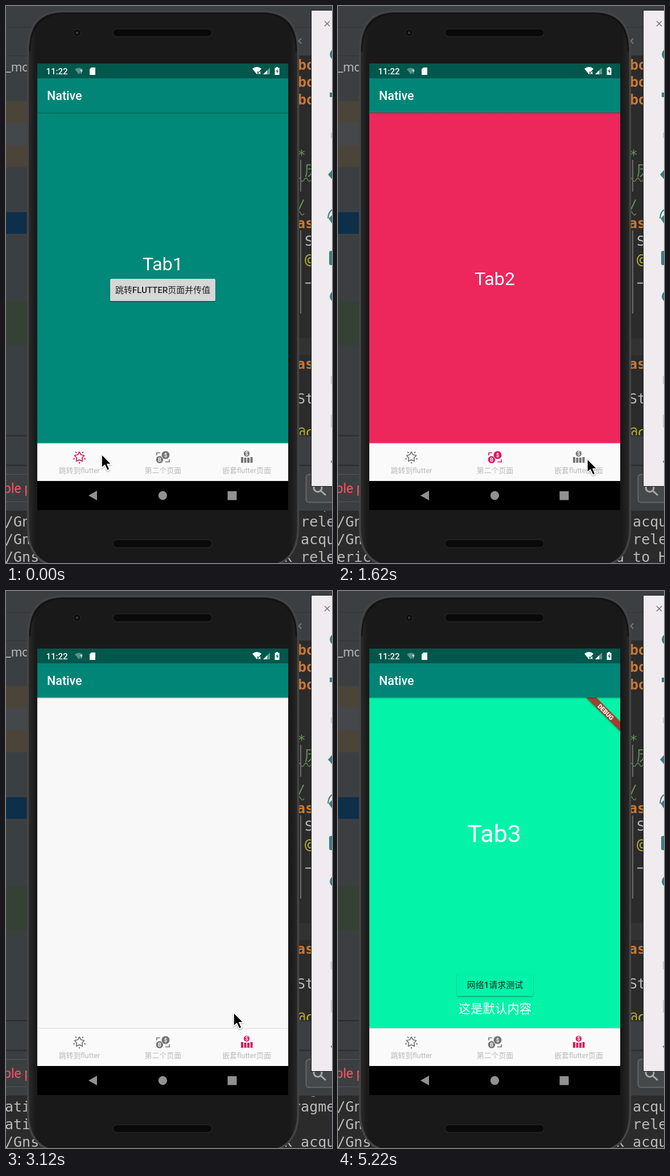
Write an HTML page that moves like this. It is 573 px wide and 978 px high and loops after 5280 ms.

```html
<!DOCTYPE html>
<html lang="zh">
<head>
<meta charset="utf-8">
<title>Native tabs</title>
<style>
  html, body { margin: 0; width: 100%; height: 100%; overflow: hidden; background: #2b2b2b; }
  svg { display: block; width: 100vw; height: 100vh; }
  text { font-family: Roboto, "Noto Sans CJK SC", "Noto Sans CJK", sans-serif; white-space: pre; }
  .mid { text-anchor: middle; }
  .code text, .log text { font-family: "DejaVu Sans Mono", "Noto Sans CJK SC", monospace; font-size: 25px; fill: #bbb; }
  .code .key { fill: #cc7832; font-weight: bold; }
  .code .doc { fill: #629755; }
  .code .note { fill: #bbb529; }
  .label { font-size: 12.9px; fill: #b9b9b9; text-anchor: middle; }
  .big { font-size: 32.2px; fill: #fff; text-anchor: middle; }
  .coin { font-size: 9px; font-weight: 700; fill: #fafafa; text-anchor: middle; }
  .icon { color: #757575; fill: currentColor; }
  .icon.on { color: #d81b60; }
</style>
</head>
<body>
<svg viewBox="0 0 573 978" preserveAspectRatio="none">
  <defs>
    <clipPath id="pageClip"><rect x="55" y="187" width="441" height="581"/></clipPath>
    <clipPath id="logClip"><rect y="887" width="573" height="91"/></clipPath>
    <linearGradient id="body" x2="1" y2="0">
      <stop offset="0" stop-color="#2b2b2b"/><stop offset=".03" stop-color="#191919"/>
      <stop offset=".97" stop-color="#191919"/><stop offset="1" stop-color="#292929"/>
    </linearGradient>
    <linearGradient id="drop" x2="0" y2="1">
      <stop offset="0" stop-color="#000" stop-opacity=".25"/><stop offset="1" stop-color="#000" stop-opacity="0"/>
    </linearGradient>
    <filter id="soft" x="-20%" y="-30%" width="140%" height="170%">
      <feDropShadow dx="0" dy="1.5" stdDeviation="1.3" flood-opacity=".35"/>
    </filter>
  </defs>

  <!-- editor window -->
  <rect width="573" height="978" fill="#3c3f41"/>
  <path d="M0 37.5H573M0 87.5H60" stroke="#313335"/>
  <rect y="167" width="60" height="38" fill="#4b4439"/>
  <rect y="205" width="60" height="40" fill="#45484a"/>
  <rect y="245" width="60" height="38" fill="#4b4439"/>
  <rect y="362" width="60" height="38" fill="#0d2f4a"/>
  <rect y="518" width="60" height="77" fill="#344134"/>
  <text x="-1" y="115" font-size="22" fill="#b4b6b8">_mc</text>
  <g class="code">
    <rect x="500" y="87" width="73" height="668" fill="#2b2b2b"/>
    <rect x="500" y="583" width="73" height="30" fill="#323232"/>
    <path d="M510 57l9 9m0-9l-9 9" stroke="#777" stroke-width="2"/>
    <text class="key" x="513" y="112">bo</text>
    <text class="key" x="513" y="142">bo</text>
    <text class="key" x="513" y="173">bo</text>
    <text class="doc" x="512" y="270">*</text>
    <text class="doc" x="525" y="298">历</text>
    <path d="M512 305q3-6 6 0t6 0t6 0t6 0M512 364q3-6 6 0t6 0" fill="none" stroke="#6a8759" stroke-width="1.5"/>
    <text class="doc" x="511" y="358">/</text>
    <text class="key" x="511" y="390">as</text>
    <text x="525" y="421">S</text>
    <text class="note" x="525" y="453">@</text>
    <path d="M518 270V326M518 394V540" stroke="#6b6b6b" stroke-width="2"/>
    <path d="M526 486.500H540" stroke="#bbb" stroke-width="2"/>
    <text class="key" x="511" y="637">as</text>
    <text x="511" y="698">St</text>
    <text class="note" x="511" y="757">@c</text>
  </g>
  <rect y="755" width="573" height="132" fill="#3c3f41"/>
  <path d="M0 754.500H573M0 806.500H573" stroke="#2b2b2b" stroke-width="2"/>
  <path d="M0 822.500H60M0 870.500H60" stroke="#555859"/>
  <text x="-4" y="855" font-size="23" fill="#ff5261">ple p</text>
  <rect x="527.500" y="822.500" width="60" height="49" rx="5" fill="#45494a" stroke="#646769" stroke-width="2"/>
  <g fill="none" stroke="#aaa" stroke-width="3"><circle cx="548" cy="846" r="7"/><path d="M553 851l9 8"/></g>
  <rect y="886" width="573" height="92" fill="#2b2b2b"/>
  <g class="log" id="log" clip-path="url(#logClip)"></g>

  <!-- emulator side panel -->
  <rect x="536.500" y="7.500" width="50" height="836" fill="#efebee" stroke="#151515"/>
  <path d="M560 26.500l9 9m0-9l-9 9" stroke="#6d6d6d" stroke-width="1.3"/>
  <g fill="#3e7c80">
    <circle cx="579" cy="85" r="10"/><rect x="569" y="152" width="6" height="8"/>
    <path d="M566 296l7-8v16zM567 373l6-6v15z"/>
    <path d="M566 373q1-12 7-15" fill="none" stroke="#3e7c80" stroke-width="2"/>
    <rect x="568" y="430" width="12" height="25" rx="3"/><circle cx="579" cy="510" r="10"/>
  </g>
  <path d="M571 231h2M572 222v8M572 650v14M572 718v22" stroke="#aaa5a9"/>
  <circle cx="573" cy="800" r="2" fill="#67777a"/>

  <!-- phone -->
  <path d="M38.500 78Q38.500 10 100 9.500H451Q513.500 10 513.500 78V915Q513.500 976 462 984H90Q38.500 976 38.500 915Z"
        fill="url(#body)" stroke="#444" stroke-width="3.500"/>
  <path d="M42 80Q42 14 102 13H449Q510 14 510 80" fill="none" stroke="#111" stroke-width="2"/>
  <g fill="#090909" stroke="#242424" stroke-width="1.500">
    <rect x="188" y="40" width="174" height="14" rx="7"/>
    <rect x="188" y="937" width="174" height="14" rx="7"/>
    <circle cx="125" cy="47" r="6"/>
  </g>
  <circle cx="125" cy="47" r="2.500" fill="#343434"/>

  <!-- pages -->
  <rect x="55" y="101" width="441" height="784" fill="#f8f8f8"/>
  <g clip-path="url(#pageClip)">
    <g id="pages">
      <g>
        <rect x="55" y="187" width="441" height="581" fill="#008878"/>
        <text class="big" x="275.500" y="464">Tab1</text>
        <rect x="183" y="479" width="185" height="39" rx="2" fill="#d6d7d7" filter="url(#soft)"/>
        <text class="mid" x="275.700" y="504" font-size="15" fill="#222">跳转<tspan font-weight="500">FLUTTER</tspan>页面并传值</text>
      </g>
      <g transform="translate(441)">
        <rect x="55" y="187" width="441" height="581" fill="#ed265c"/>
        <text class="big" x="275.500" y="490">Tab2</text>
      </g>
      <g transform="translate(882)">
        <rect x="55" y="187" width="441" height="581" fill="#f8f8f8"/>
        <g id="content">
          <rect x="55" y="187" width="441" height="581" fill="#03f3a8"/>
          <text class="big" x="274.500" y="441" style="font-size:42.900px">Tab3</text>
          <rect x="209" y="672" width="134" height="39" rx="2" fill="#03f3a8" filter="url(#soft)"/>
          <text class="mid" x="276" y="697" font-size="15" font-weight="500" fill="#1d2b27">网络1请求测试</text>
          <text class="mid" x="276" y="741" font-size="21.400" fill="#fff">这是默认内容</text>
          <path d="M436 187H454L496 229V246Z" fill="#a0402f" filter="url(#soft)"/>
          <text class="mid" transform="translate(470.500 212.500) rotate(45)" y="3.800" font-size="10.900" font-weight="900" fill="#fff">DEBUG</text>
        </g>
      </g>
    </g>
    <rect x="55" y="187" width="441" height="3" fill="url(#drop)"/>
  </g>

  <!-- status and title bars -->
  <rect x="55" y="101" width="441" height="26" fill="#00574b"/>
  <rect x="55" y="127" width="441" height="60" fill="#008577"/>
  <text x="72" y="165" font-size="21.500" font-weight="500" fill="#fff">Native</text>
  <text x="70.500" y="119.500" font-size="15" font-weight="500" fill="#fff">11:22</text>
  <path d="M121 111q7-5 14 0l-7 9z" fill="#fff" opacity=".35"/>
  <text x="130" y="119" font-size="9" font-weight="700" fill="#fff">?</text>
  <g fill="#fff">
    <path d="M150 108h7v13h-10v-10z"/>
    <path d="M433 110q8-6 16 0l-4 5h-3v4l-1 1z"/>
    <path d="M443.500 115.500l4 4m0-4l-4 4" stroke="#fff" stroke-width="1.300"/>
    <path d="M464 108v12h-12z" opacity=".4"/><path d="M459 113v7h-7z"/>
    <path d="M475 107h3v1.500h2.500V121h-8v-12.500h2.500z"/>
  </g>
  <path d="M477.500 110l-3 5h2l-.5 4 3-5h-2z" fill="#00574b"/>

  <!-- bottom tabs -->
  <rect x="55" y="768" width="441" height="66" fill="#fafafa"/>
  <rect x="55" y="767.500" width="441" height="1" fill="#e8dadd"/>
  <g class="icon">
    <path id="star" fill="none" stroke="currentColor" stroke-width="1.700" stroke-linejoin="round"/>
    <path id="rays" fill="none" stroke="currentColor" stroke-width="1.800" stroke-linecap="round"/>
  </g>
  <g class="icon">
    <path d="M265 789v-4.500h6M287 796v4.500h-7" fill="none" stroke="currentColor" stroke-width="1.700"/>
    <circle cx="270" cy="796.500" r="6.300"/>
    <circle cx="280.500" cy="788.500" r="7.500" stroke="#fafafa"/>
    <text class="coin" x="270" y="799.700">B</text><text class="coin" x="280.500" y="791.800">$</text>
  </g>
  <g class="icon">
    <path d="M413 792h4v10h-4zM418.500 793h4v9h-4zM424 793h4v9h-4zM429.500 792h4v10h-4z"/>
    <circle cx="423" cy="786" r="5.500" stroke="#fafafa" stroke-width=".8"/>
    <text class="coin" x="423" y="789.200">$</text>
  </g>
  <text class="label" x="129" y="819.500">跳转到flutter</text>
  <text class="label" x="276" y="819.500">第二个页面</text>
  <text class="label" x="423" y="819.500">嵌套flutter页面</text>

  <!-- system keys -->
  <rect x="55" y="834" width="441" height="51" fill="#000"/>
  <g fill="#919191">
    <path d="M145 859.500L160 851V868Z"/><circle cx="275.500" cy="859.500" r="7.700"/>
    <rect x="389.500" y="852" width="16" height="15.500"/>
  </g>

  <path id="cursor" d="M0 0V24L5.500 19 10 28.500 14.200 26.600 10 17.500H17.300Z" fill="#000" stroke="#fff"
        stroke-width="1.600" stroke-linejoin="round" filter="url(#soft)"/>
</svg>
<script>
  const LOOP = 5280, STEP = 60, PAGE = 441, SLIDE = 200;
  const $ = id => document.getElementById(id);
  const icons = document.querySelectorAll('.icon');

  // time, x, y of the pointer tip
  const path = [
    [0, 168, 787], [240, 168, 787], [840, 269, 790], [1080, 269, 790], [1560, 438, 795],
    [1740, 438, 795], [2040, 426, 789], [2460, 426, 789], [3120, 400, 740], [3480, 328, 635],
    [3780, 312, 612], [4440, 312, 612], [5100, 595, 430]
  ];
  const slides = [1030, 2208];
  // when each tab is tinted
  const tints = [[0, 1020], [900, 2200], [2100, LOOP]];
  const contentAt = 3360;

  // time, left end and right end of each log line
  const gnss = '/Gnss';
  const lines = [
    [0, gnss, '  acqu'], [0, gnss, 'k rele'], [0, gnss, 'k acqu'], [0, gnss, 'k rele'],
    [1500, 'erics', 'd to H'],
    [2220, 'ative', '  ateV'], [2220, 'ative', ' d ext'], [2220, 'ative', 'teCont'],
    [2820, 'ative', ' ragme'], [2820, 'ative', ' ragme'], [2820, 'ative', ''],
    [3060, gnss, 'k acqu'],
    [3360, 'id.qu', '  ceEn'], [3360, 'id.qu', ' Could'], [3360, 'id.qu', ' Could'],
    [4080, gnss, 'k acqu'], [4140, gnss, 'k rele'], [5100, gnss, 'k acqu']
  ];

  const polar = (r, deg) => {
    const a = deg * Math.PI / 180;
    return `${129 + r * Math.sin(a)} ${792 - r * Math.cos(a)}`;
  };
  $('star').setAttribute('d', 'M' + Array.from({ length: 10 }, (_, i) => polar(i % 2 ? 4.9 : 9, i * 36)).join('L') + 'Z');
  $('rays').setAttribute('d', Array.from({ length: 5 }, (_, i) => `M${polar(9.2, 36 + i * 72)}L${polar(10.8, 36 + i * 72)}`).join(''));

  const addText = (x, y) => {
    const el = document.createElementNS('http://www.w3.org/2000/svg', 'text');
    el.setAttribute('x', x);
    el.setAttribute('y', y);
    return $('log').appendChild(el);
  };
  const rows = [883, 914, 945, 976].map(y => [addText(-2, y), addText(488, y)]);

  const smooth = k => k * k * (3 - 2 * k);

  function pointer(t) {
    const i = path.findIndex(p => p[0] > t);
    if (i < 0) return path[path.length - 1].slice(1);
    const [a, b] = [path[i - 1], path[i]];
    const k = smooth((t - a[0]) / (b[0] - a[0]));
    return [a[1] + (b[1] - a[1]) * k, a[2] + (b[2] - a[2]) * k];
  }

  // decelerating page scroll
  function pageShift(t) {
    return slides.reduce((sum, start) => {
      const k = Math.min(1, Math.max(0, (t - start) / SLIDE));
      return sum + 1 - (1 - k) ** 5;
    }, 0);
  }

  function draw(t) {
    $('pages').setAttribute('transform', `translate(${-Math.round(PAGE * pageShift(t))})`);
    $('content').setAttribute('visibility', t >= contentAt ? 'visible' : 'hidden');
    $('cursor').setAttribute('transform', `translate(${pointer(t)})`);
    icons.forEach((el, i) => el.classList.toggle('on', t >= tints[i][0] && t < tints[i][1]));
    const shown = lines.filter(l => l[0] <= t).slice(-4);
    rows.forEach(([left, right], i) => {
      left.textContent = shown[i][1];
      right.textContent = shown[i][2];
    });
  }

  const start = performance.now();
  function tick() {
    const t = Math.max(0, performance.now() - start) % LOOP;
    draw(Math.floor(t / STEP) * STEP);
    requestAnimationFrame(tick);
  }
  tick();
</script>
</body>
</html>
```
